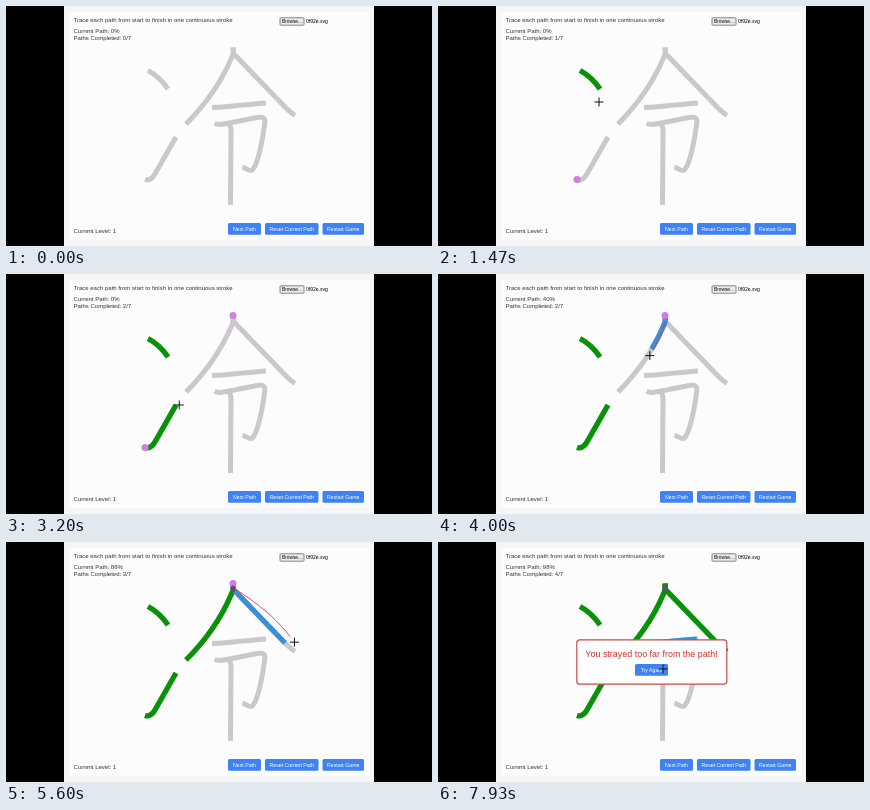
Write an HTML page that moves like this. It is 426x240 px and loops after 8000 ms.

```html
<!DOCTYPE html>
<html lang="en">
<head>
<meta charset="utf-8">
<title>Stroke tracing game</title>
<style>
  html, body { margin: 0; width: 100%; height: 100%; overflow: hidden; background: #000; }
  svg { display: block; width: 100%; height: 100%; font: 6px "Liberation Sans", Arial, sans-serif; }
  text { fill: #333; }
  .button rect { fill: #3f83f3; }
  .button text { fill: #fff; font-size: 5.2px; text-anchor: middle; }
  .stroke { fill: none; stroke-width: 5; stroke-linejoin: round; }
  .base { stroke: #cbc8cc; }
  .ink { stroke-width: 5.3; }
  .dot { fill: #cf7ee2; }
</style>
</head>
<body>
<svg viewBox="0 0 426 240">
  <rect width="426" height="240"/>
  <rect x="58" width="310" height="240" fill="#f6f6f6"/>
  <rect x="63" y="6" width="301" height="228" rx="2" fill="#fcfcfd"/>
  <text x="67.5" y="16.1">Trace each path from start to finish in one continuous stroke</text>
  <text id="percent" x="67.5" y="27.2"></text>
  <text id="count" x="67.5" y="34.2"></text>
  <text x="67.5" y="227.2">Current Level: 1</text>
  <rect x="274" y="11.8" width="24" height="7.4" rx="1" fill="#ededed" stroke="#555" stroke-width=".7"/>
  <text x="286" y="17.2" text-anchor="middle" style="font-size:4.8px;fill:#000">Browse...</text>
  <text x="300" y="17.2" style="font-size:5px;fill:#000">0f92e.svg</text>
  <g id="strokes"></g>
  <g id="dots"></g>
  <ellipse id="joint" cx="227" cy="47" rx="2.3" ry="3.4" fill="#654b68"/>
  <polyline id="trail" fill="none" stroke="#e8364a" stroke-width=".9"/>
  <g id="buttons"></g>
  <g id="dialog">
    <rect x="138.8" y="97.8" width="150" height="44.4" rx="3" fill="#fff" stroke="#c94a45" stroke-width="1.2"/>
    <text x="213.5" y="115" text-anchor="middle" style="font-size:8.95px;fill:#d0312d">You strayed too far from the path!</text>
  </g>
  <path id="cursor" d="M-4.5 0H4.5M0-4.5V4.5" stroke="#111"/>
</svg>
<script>
const $ = id => document.getElementById(id);
const LOOP = 8000, STEP = 1000 / 15, FAIL = 7250, ENTER = 200;
const LEAD = .07; // how far the pointer runs ahead of the ink

// stray: how far the hand bows away from the path
const strokes = [
  { d: "M142 64.5Q154 71 162 83", from: 520, to: 1130, stray: 2 },
  { d: "M139 173.5Q145 175.5 149.5 167L170 131", from: 2130, to: 3150, stray: -4 },
  { d: "M227 41.5C228 47 227 49 225 53Q210 88 180 118", from: 3770, to: 4340, stray: 2 },
  { d: "M227 41.5V47L280 102Q285 107 289 109.5", from: 5000, to: 5698, stray: 9 },
  { d: "M206 101.5Q214 101.5 222 100.5T260 97", from: 6250, to: 7199, stray: 4, max: .98 },
  { d: "M208.5 117.5Q213 119 218 118L251 111.5C259 110 259.5 113 258.5 119C255 146 249 164 245.5 164.5C243 165 240 162.5 236.5 161" },
  { d: "M223 118Q225 120 225 126L224.5 199" }
];
const drawn = strokes.filter(s => s.from);

function add(parent, tag, attrs) {
  const el = document.createElementNS("http://www.w3.org/2000/svg", tag);
  for (const key in attrs) el.setAttribute(key, attrs[key]);
  return parent.appendChild(el);
}

function addButton(parent, x, y, width, label) {
  const g = add(parent, "g", { class: "button" });
  add(g, "rect", { x, y, width, height: 11.8, rx: 1.5 });
  add(g, "text", { x: x + width / 2, y: y + 7.6 }).textContent = label;
}

function show(el, on) {
  el.style.display = on ? "" : "none";
}

const progress = (s, t) => Math.min(s.max || 1, (t - s.from) / (s.to - s.from));

// Hand position beside a stroke, offset along its normal
function handOn(s, p) {
  p = Math.min(1, p);
  const length = s.ink.getTotalLength(), at = p * length;
  const a = s.ink.getPointAtLength(Math.max(0, at - .5));
  const b = s.ink.getPointAtLength(Math.min(length, at + .5));
  const angle = Math.atan2(b.y - a.y, b.x - a.x);
  const offset = s.stray * Math.sin(2.4 * p);
  return {
    x: (a.x + b.x) / 2 + offset * Math.sin(angle),
    y: (a.y + b.y) / 2 - offset * Math.cos(angle)
  };
}

for (const s of strokes) add($("strokes"), "path", { d: s.d, class: "stroke base" });
for (const s of drawn) s.ink = add($("strokes"), "path", { d: s.d, class: "stroke ink", pathLength: 100 });

// Each start dot lasts until the following stroke begins
const dots = drawn.slice(1).map((s, i) => {
  const { x, y } = s.ink.getPointAtLength(0);
  const next = drawn[i + 2];
  return {
    from: drawn[i].to,
    to: next ? next.from : LOOP,
    el: add($("dots"), "circle", { cx: x, cy: y, r: 3.5, class: "dot" })
  };
});

addButton($("buttons"), 222, 217, 33, "Next Path");
addButton($("buttons"), 259, 217, 53.5, "Reset Current Path");
addButton($("buttons"), 316.5, 217, 41.5, "Restart Game");
addButton($("dialog"), 197, 122, 33, "Try Again");

// Pointer pauses between strokes, joined with the stroke ends
const stops = [
  { t: ENTER, x: 190, y: 40 },
  { t: 1467, x: 161, y: 96 },
  { t: 4733, x: 231, y: 68 },
  { t: 7850, x: 225, y: 127 },
  { t: LOOP, x: 225, y: 127 }
];
for (const s of drawn) {
  stops.push({ t: s.from, ...handOn(s, LEAD) }, { t: s.to, ...handOn(s, 1) });
}
stops.sort((a, b) => a.t - b.t);

function pointer(t) {
  const s = drawn.find(s => t >= s.from && t <= s.to);
  if (s) return handOn(s, progress(s, t) + LEAD);
  const i = Math.max(1, stops.findIndex(stop => stop.t >= t));
  const a = stops[i - 1], b = stops[i];
  const k = Math.max(0, (t - a.t) / (b.t - a.t)), ease = k * k * (3 - 2 * k);
  return { x: a.x + (b.x - a.x) * ease, y: a.y + (b.y - a.y) * ease };
}

function draw(t) {
  let done = 0, percent = 0;
  const trail = [];
  for (const s of drawn) {
    const p = progress(s, t), complete = p >= 1;
    show(s.ink, p > 0);
    if (p <= 0) continue;
    s.ink.setAttribute("stroke", complete ? "#069406" : "#398fd8");
    s.ink.setAttribute("stroke-dasharray", complete ? "none" : `${p * 100} 200`);
    if (complete) {
      done++;
      continue;
    }
    percent = Math.round(p * 100);
    for (let u = LEAD; u <= p && t < FAIL; u += .03) {
      const { x, y } = handOn(s, u);
      trail.push(`${x},${y}`);
    }
  }
  $("percent").textContent = `Current Path: ${percent}%`;
  $("count").textContent = `Paths Completed: ${done}/7`;
  $("trail").setAttribute("points", trail.join(" "));

  for (const d of dots) show(d.el, t >= d.from && t < d.to);
  show($("joint"), done >= 3);
  show($("dialog"), t >= FAIL);
  show($("cursor"), t >= ENTER);
  const { x, y } = pointer(t);
  $("cursor").setAttribute("transform", `translate(${x} ${y})`);
}

const start = performance.now();
function tick() {
  const t = (performance.now() - start) % LOOP;
  draw(Math.min(LOOP - STEP, Math.floor(t / STEP + .1) * STEP));
  requestAnimationFrame(tick);
}
tick();
</script>
</body>
</html>
```
